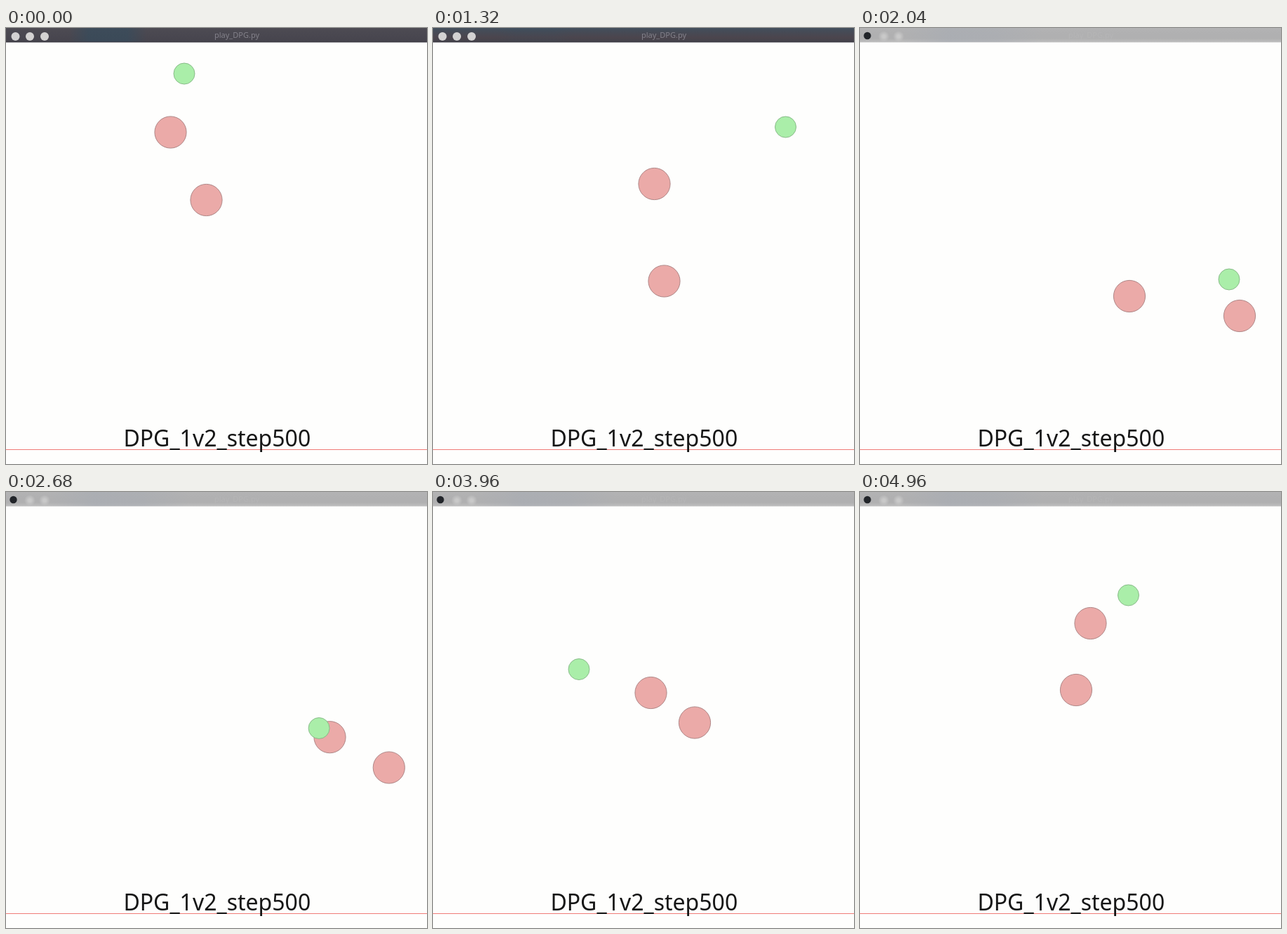
Animation, 600 px wide and 621 px high, one loop 5000 ms. Source, as an HTML page with a canvas:

```html
<!DOCTYPE html>
<html lang="en">
<head>
<meta charset="utf-8">
<title>play_DPG.py</title>
<style>
html, body { margin: 0; width: 100%; height: 100%; overflow: hidden; background: #fefefd; }
canvas { display: block; }
</style>
</head>
<body>
<canvas id="stage" width="600" height="621"></canvas>
<script>
const ctx = document.getElementById('stage').getContext('2d');
const LOOP = 5000, STEP = 40, SPEED = 1.2;

// key poses: time, runner, two chasers
const poses = [
  [0, [254, 65], [234.5, 148.5], [285.5, 245]],
  [760, [429, 203.5], [456, 269], [468, 351.5]],
  [1320, [502.5, 141], [315.5, 222], [329.5, 360.5]],
  [2040, [526, 358], [384, 382], [541, 410]],
  [3280, [272, 182], [164.5, 343.5], [121, 437.5]],
  [3960, [208, 252.5], [310.5, 286], [373, 328.5]],
  [4960, [382.5, 147], [328.5, 187], [308, 282]]
];

const clamp = (v, lo, hi) => Math.min(hi, Math.max(lo, v));
const ramp = (t, a, b) => clamp((t - a) / (b - a), 0, 1);
const mix = (p, q, u) => p.map((v, k) => v + (q[k] - v) * u);
const sub = (p, q) => p.map((v, k) => v - q[k]);
const inside = (p, r) => p.map(v => clamp(v, r, 600 - r));

function leg(t) {
  const i = Math.max(1, poses.findIndex(p => p[0] >= t));
  const [a, b] = [poses[i - 1], poses[i]];
  return { a, b, u: ramp(t, a[0], b[0]) };
}

// at every key pose the runner heads straight away from the pack
function flee([, run, one, two]) {
  const d = sub(run, mix(one, two, 0.5)), len = Math.hypot(...d);
  return d.map(v => v / len * SPEED);
}

function runner(t) {
  const { a, b, u } = leg(clamp(t, 0, 4960));
  const v = 1 - u, pull = u * v * (b[0] - a[0]);
  const out = flee(a), back = flee(b);
  const p = mix(a[1], b[1], u * u * (3 - 2 * u));
  return inside(p.map((x, k) => x + pull * (v * out[k] - u * back[k])), 15);
}

// a chaser trails the runner, averaged over a short window
const trail = (t, lag) => mix(runner(t - lag - 60), runner(t - lag + 60), 0.5);

function chaser(t, n) {
  const lag = 60 + n * 70, { a, b, u } = leg(t);
  const miss = p => sub(p[n + 1], trail(p[0], lag));
  const fix = mix(miss(a), miss(b), u);
  return inside(trail(t, lag).map((v, k) => v + fix[k]), 23);
}

function disc(x, y, r, fill) {
  ctx.beginPath();
  ctx.arc(x, y, r, 0, 2 * Math.PI);
  ctx.fillStyle = fill;
  ctx.fill();
}

function ball([x, y], r, fill, edge) {
  disc(x, y, r, fill);
  ctx.strokeStyle = edge;
  ctx.lineWidth = 0.9;
  ctx.stroke();
}

function text(str, x, y, size, fill) {
  ctx.font = size + 'px "Noto Sans", "Open Sans", sans-serif';
  ctx.textAlign = 'center';
  ctx.fillStyle = fill;
  ctx.fillText(str, x, y);
}

function rect(y, h, fill) {
  ctx.fillStyle = fill;
  ctx.fillRect(0, y, 600, h);
}

function band(x0, y0, x1, y1, ...colors) {
  const g = ctx.createLinearGradient(x0, y0, x1, y1);
  colors.forEach((c, i) => g.addColorStop(i / (colors.length - 1), c));
  rect(0, 20, g);
}

function windowBar(t) {
  band(0, 0, 0, 20, '#4d4b53', '#46444d');
  band(90, 0, 200, 0, '#354c5d00', '#354c5daa', '#354c5daa', '#354c5daa', '#354c5d00');
  ctx.globalAlpha = ramp(t, 1160, 1320) * 0.8;
  band(0, 0, 0, 20, '#40505f', '#464a55', '#4c454d', '#43424a');
  ctx.globalAlpha = 1;
  rect(19.5, 1, '#34323c');
  for (const x of [13.5, 34, 55]) disc(x, 12, 6, '#d3d2d2');
  text('play_DPG.py', 329, 14, 11, '#83818a');
}

function menuBar() {
  band(0, 0, 0, 20, '#b3b3b4', '#b1b1b2', '#b0b0b1', '#b0b0b1', '#bebebe');
  band(60, 0, 260, 0, '#a8acb300', '#a8acb3aa', '#a8acb388', '#a8acb300');
  rect(20, 1, '#e2e2e2');
  for (const x of [34, 55]) {
    const g = ctx.createRadialGradient(x, 12, 2, x, 12, 8);
    g.addColorStop(0, '#c9c9c9');
    g.addColorStop(1, '#c9c9c900');
    disc(x, 12, 8, g);
  }
  text('play_DPG.py', 329, 14, 11, '#b5b5b6');
  disc(10.5, 11, 5.2, '#22252a');
}

function draw(t) {
  rect(0, 621, '#fefefd');
  windowBar(t);
  ctx.globalAlpha = ramp(t, 1340, 1600);
  menuBar();
  ctx.globalAlpha = 1;

  rect(600, 1, '#f07c78');
  text('DPG_1v2_step500', 300.8, 596, 32, '#161616');

  for (const n of [1, 2]) ball(chaser(t, n), 22.6, '#ebaaa8', '#a87f7f');
  ball(runner(t), 15, '#aaeea9', '#83b583');
}

const start = performance.now();
function tick(now) {
  const t = Math.max(0, now - start) % LOOP;
  draw(Math.floor(t / STEP) * STEP);
  requestAnimationFrame(tick);
}
draw(0);
requestAnimationFrame(tick);
</script>
</body>
</html>
```
